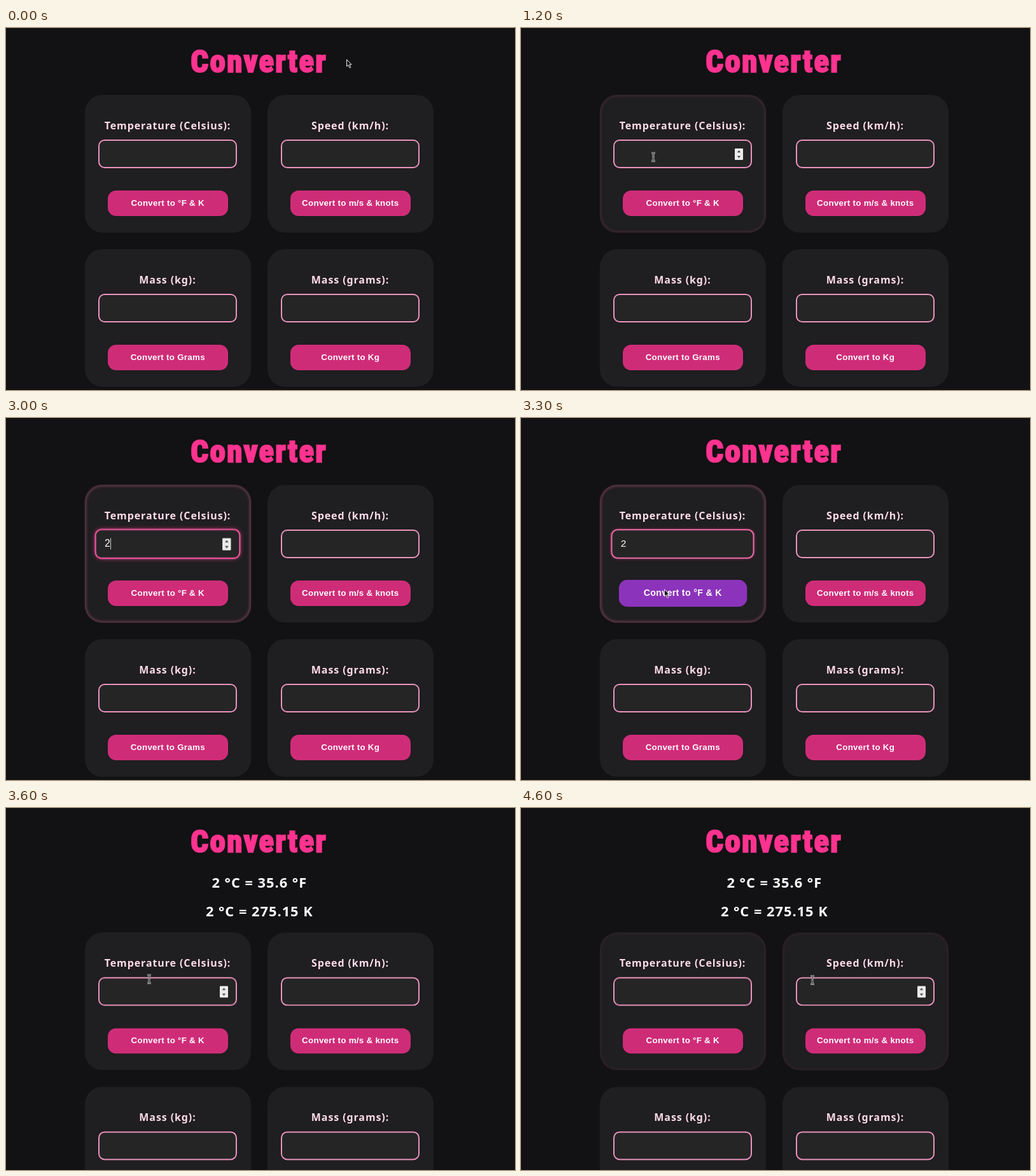
An HTML page that plays this animation: 800x568 px, repeating every 4700 ms.

```html
<!DOCTYPE html>
<html lang="en">
<head>
<meta charset="utf-8">
<title>Converter</title>
<style>
  html, body { margin: 0; width: 100%; height: 100%; overflow: hidden; background: #121113; }
  #stage { position: relative; width: 800px; height: 568px; overflow: hidden; background: #121113; }
  #stage * { box-sizing: border-box; }

  /* Every track shares one 4.7 s loop; poses hold for 100 ms steps. */
  .track { animation: 4.7s step-end infinite; }

  #grid {
    position: absolute; left: 123.5px; top: 105px;
    display: grid; grid-template: 216px 216px / 261px 261px; gap: 26px;
    animation-name: drop;
  }
  .card { position: relative; border-radius: 27px; background: #1f1e20; text-align: center; }
  .card > * { position: absolute; }
  .glow {
    inset: 0; border-radius: 27px; opacity: 0;
    border: 2px solid rgba(255, 130, 170, .2);
    box-shadow: 0 0 2px rgba(255, 120, 165, .3), inset 0 0 4px rgba(255, 120, 165, .35);
  }
  .label {
    left: 0; right: 0; top: 37.8px;
    font: 700 16px/20px "Noto Sans", "Open Sans", sans-serif;
    letter-spacing: .9px; color: #ffdbe9;
  }
  .field {
    left: 21.5px; top: 70px; width: 218px; height: 45px;
    border: 2px solid #ea93bc; border-radius: 10px; background: #252526;
    font: 15px/20px "Liberation Sans", Arial, sans-serif; color: #fff;
  }
  .field > * { position: absolute; opacity: 0; }
  .button {
    left: 36.5px; top: 150px; width: 188.5px; height: 40.4px;
    border-radius: 13px; background: #cf2c78; color: #fff;
    font: 700 13.33px/40px "Liberation Sans", Arial, sans-serif; letter-spacing: .29px;
  }
  .spinner { right: 12.5px; top: 11.8px; width: 13px; height: 18px; }
  .digit { left: 12.8px; top: 10.4px; }
  .caret { left: 12.9px; top: 12px; width: 1px; height: 17px; background: #c8c8c8; }

  .temp .glow { animation-name: temp-glow; }
  .temp .field { animation-name: focus; }
  .temp .spinner { animation-name: temp-spinner; }
  .temp .digit { animation-name: digit; }
  .temp .caret { animation-name: caret; }
  .temp .button { animation-name: press; }
  .speed .glow { animation-name: speed-glow; }
  .speed .spinner { animation-name: speed-spinner; }

  #over { position: absolute; left: 0; top: 0; }
  #over text { text-anchor: middle; }
  #head {
    font: 700 49px Impact, "Roboto Condensed", Roboto, sans-serif; font-stretch: 75%;
    letter-spacing: 2.3px; fill: #ff338f; stroke: #ff338f; stroke-width: 2.4px;
  }
  #results {
    font: 700 21.8px "Noto Sans", "Open Sans", sans-serif; letter-spacing: 1px;
    fill: #fff; opacity: 0; animation-name: results;
  }
  #cursor { animation-name: move; }
  #arrow { animation-name: arrow; }
  #beam { opacity: 0; animation-name: beam; }

  @keyframes drop { 0% { transform: none; } 76.59%, 100% { transform: translateY(90.4px); } }
  @keyframes results { 0% { opacity: 0; } 76.59%, 100% { opacity: 1; } }

  @keyframes move {
    0% { transform: translate(535px, 49px); animation-timing-function: steps(3); }
    6.38% { transform: translate(536px, 42px); }
    12.76% { transform: translate(536px, 42px); animation-timing-function: steps(2); }
    17.02% { transform: translate(490px, 66px); }
    19.14% { transform: translate(433px, 95px); }
    21.27% { transform: translate(350px, 135px); }
    23.4% { transform: translate(250px, 183px); }
    25.53% { transform: translate(208px, 202.5px); }
    65.95% { transform: translate(215px, 232px); }
    68.08% { transform: translate(223px, 260px); }
    70.21% { transform: translate(225px, 268.5px); }
    80.85% { transform: translate(225px, 268.5px); animation-timing-function: steps(4); }
    89.36% { transform: translate(262px, 272px); animation-timing-function: steps(2); }
    93.61% { transform: translate(352px, 272px); }
    95.74% { transform: translate(412px, 271px); }
    97.87%, 100% { transform: translate(458px, 270px); }
  }
  @keyframes arrow {
    0%, 65.95%, 95.74% { opacity: 1; }
    23.4%, 76.59%, 97.87%, 100% { opacity: 0; }
  }
  @keyframes beam {
    0%, 61.7%, 95.74% { opacity: 0; }
    23.4%, 76.59%, 97.87%, 100% { opacity: 1; }
  }

  @keyframes temp-glow {
    0% { opacity: 0; }
    21.27% { opacity: 0; animation-timing-function: steps(5); }
    31.91% { opacity: 1; }
    76.59% { opacity: 0; animation-timing-function: steps(4); }
    85.1% { opacity: 1; }
    95.74% { opacity: .6; }
    97.87%, 100% { opacity: .25; }
  }
  @keyframes speed-glow {
    0% { opacity: 0; }
    95.74% { opacity: .08; }
    97.87%, 100% { opacity: .22; }
  }
  @keyframes focus {
    0%, 74.46%, 100% { transform: none; border-color: #ea93bc; box-shadow: 0 0 0 rgba(255, 70, 150, 0); }
    29.78% {
      transform: none; border-color: #ea93bc; box-shadow: 0 0 0 rgba(255, 70, 150, 0);
      animation-timing-function: steps(3);
    }
    36.17% { transform: scale(1.05); border-color: #f85aa3; box-shadow: 0 0 6px rgba(255, 70, 150, .6); }
    68.08% {
      transform: scale(1.05); border-color: #f85aa3; box-shadow: 0 0 6px rgba(255, 70, 150, .6);
      animation-timing-function: steps(3);
    }
  }
  @keyframes temp-spinner {
    0%, 70.21%, 95.74%, 100% { opacity: 0; }
    23.4%, 76.59% { opacity: 1; }
  }
  @keyframes speed-spinner { 0% { opacity: 0; } 97.87%, 100% { opacity: 1; } }
  @keyframes digit { 0%, 76.59%, 100% { opacity: 0; } 61.7% { opacity: 1; } }
  @keyframes caret {
    0%, 46.8% { opacity: 0; transform: none; }
    31.91%, 57.44% { opacity: 1; transform: none; }
    61.7% { opacity: 1; transform: translateX(8.3px); }
    70.21%, 100% { opacity: 0; transform: none; }
  }
  @keyframes press {
    0%, 76.59%, 100% { transform: none; background: #cf2c78; }
    65.95% { transform: none; background: #cf2c78; animation-timing-function: steps(3); }
    72.34% { transform: scale(1.1); background: #6a37dc; }
  }
</style>
</head>
<body>
<div id="stage">
  <div id="grid" class="track">
    <div class="card temp">
      <div class="glow track"></div>
      <div class="label">Temperature (Celsius):</div>
      <div class="field track">
        <span class="digit track">2</span>
        <i class="caret track"></i>
        <svg class="spinner track" viewBox="0 0 13 18"><use href="#spin"/></svg>
      </div>
      <div class="button track">Convert to °F &amp; K</div>
    </div>
    <div class="card speed">
      <div class="glow track"></div>
      <div class="label">Speed (km/h):</div>
      <div class="field">
        <svg class="spinner track" viewBox="0 0 13 18"><use href="#spin"/></svg>
      </div>
      <div class="button">Convert to m/s &amp; knots</div>
    </div>
    <div class="card">
      <div class="label">Mass (kg):</div>
      <div class="field"></div>
      <div class="button">Convert to Grams</div>
    </div>
    <div class="card">
      <div class="label">Mass (grams):</div>
      <div class="field"></div>
      <div class="button">Convert to Kg</div>
    </div>
  </div>

  <svg id="over" width="800" height="568" viewBox="0 0 800 568">
    <defs>
      <g id="spin">
        <rect width="13" height="18" rx="1" fill="#ececec"/>
        <path d="M3.7 6.3 6.5 3l2.8 3.3zM3.7 11.7 6.5 15l2.8-3.3z" fill="#444"/>
      </g>
      <path id="bar" d="M-3-6.3Q0-6.3 0-4V4Q0 6.3-3 6.3M3-6.3Q0-6.3 0-4M0 4Q0 6.3 3 6.3M-1.6 2H1.6" fill="none"/>
    </defs>
    <text id="head" x="397.5" y="68.7">Converter</text>
    <g id="results" class="track">
      <text x="398.3" y="125">2 °C = 35.6 °F</text>
      <text x="398.3" y="170">2 °C = 275.15 K</text>
    </g>
    <g id="cursor" class="track">
      <path id="arrow" class="track" d="M.5.5V11.3L3 9 5 13.6 6.9 12.8 4.9 8.3H8z" fill="#111" stroke="#eee"/>
      <g id="beam" class="track">
        <use href="#bar" stroke="#d0d0d0" stroke-width="2.8"/>
        <use href="#bar" stroke="#222"/>
      </g>
    </g>
  </svg>
</div>
</body>
</html>
```
